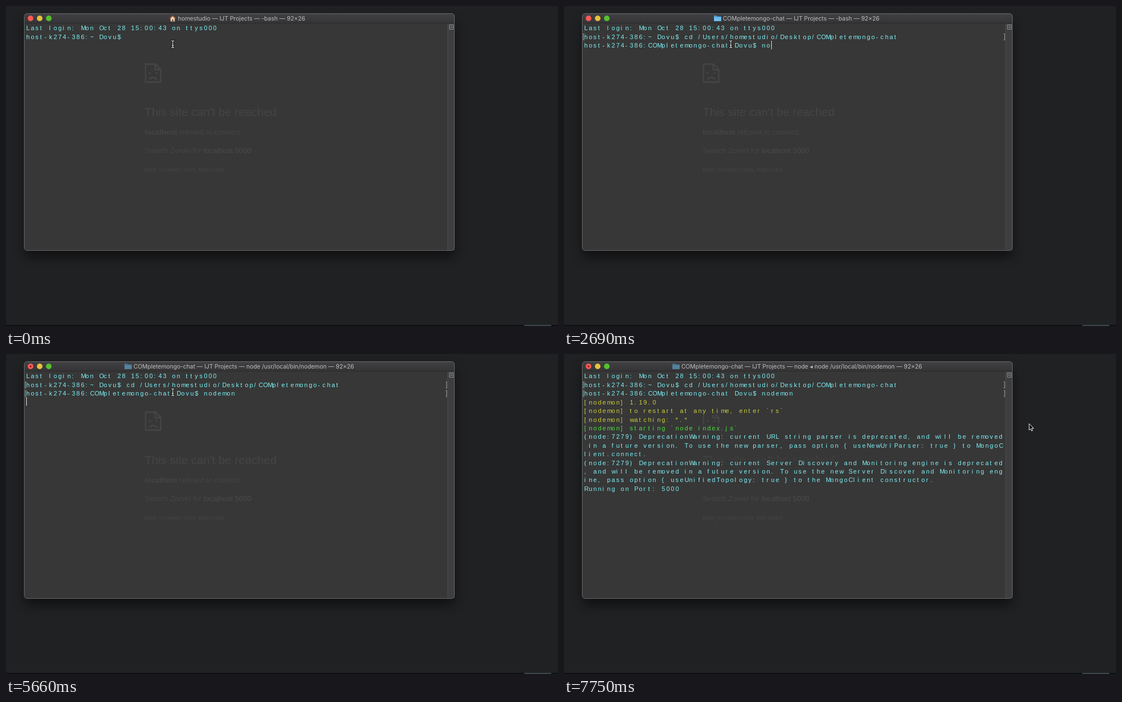
Animation, 983 px wide and 570 px high, one loop 8000 ms. Source, as an HTML page:

```html
<!DOCTYPE html>
<html lang="en">
<head>
<meta charset="utf-8">
<title>Terminal session</title>
<style>
  html, body { margin: 0; width: 100%; height: 100%; overflow: hidden; background: #202123; }
  svg { display: block; width: 100vw; height: 100vh; }
  text { white-space: pre; }
  .term { font: 11px "Liberation Sans", Arial, sans-serif; }
  .title { font: 10.45px Inter, sans-serif; fill: #bebebe; }
  .ghost { font: 13.2px "Liberation Sans", Arial, sans-serif; fill: #454545; }
</style>
</head>
<body>
<svg viewBox="0 0 983 570" xmlns="http://www.w3.org/2000/svg">
  <defs>
    <linearGradient id="bar" x2="0" y2="1">
      <stop stop-color="#414143"/>
      <stop offset="1" stop-color="#353537"/>
    </linearGradient>
    <filter id="blur" x="-10%" y="-15%" width="120%" height="130%">
      <feGaussianBlur stdDeviation="10"/>
    </filter>
  </defs>

  <rect width="983" height="570" fill="#202123"/>
  <rect y="568" width="983" height="2" fill="#0e0f10"/>
  <rect x="923" y="568" width="48" height="2" fill="#3b474c"/>
  <rect x="33" y="26" width="766" height="421" rx="8" fill="#000" opacity=".5" filter="url(#blur)"/>

  <!-- window -->
  <rect x="33" y="13.5" width="766" height="422" rx="5" fill="#373737"/>
  <path d="M33 30V18.500a5 5 0 0 1 5-5H794a5 5 0 0 1 5 5V30Z" fill="url(#bar)"/>
  <path d="M33 30.500H799" stroke="#2a2a2b"/>

  <!-- page showing through -->
  <g class="ghost">
    <path d="M248.500 103.500H266L275.500 113V135.500H248.500ZM265.500 104V113.500H275M255 131q7-7.500 14 0"
          fill="none" stroke="#454545" stroke-width="2.400"/>
    <path d="M254.500 118h3v3h-3zM266.500 118h3v3h-3z"/>
    <text x="247" y="196" font-size="20.700" style="font-size:20.700px">This site can't be reached</text>
    <text x="247" y="229"><tspan font-weight="bold">localhost</tspan> refused to connect.</text>
    <text x="247" y="262">Search Zorvel for <tspan fill="#4a4a4a">localhost 5000</tspan></text>
    <text x="247" y="294.500" style="font-size:9.700px">ERR_CONNECTION_REFUSED</text>
  </g>

  <!-- scroll bar -->
  <rect x="786" y="31" width="12.500" height="404" fill="#3e3e3f"/>
  <path d="M786.500 31V435" stroke="#4b4b4c"/>
  <path d="M789.500 33.500h7v8h-7zM791 36h4M791 38.500h4" fill="none" stroke="#8e8e8e"/>
  <rect x="32.500" y="13.500" width="766" height="422" rx="5" fill="none" stroke="#68686a"/>

  <!-- title bar -->
  <circle cx="43.700" cy="22" r="5" fill="#fb5a54"/>
  <circle cx="60" cy="22" r="5" fill="#e6bf3c"/>
  <circle cx="76.200" cy="22" r="5" fill="#54c22f"/>
  <circle id="busy" cx="43.700" cy="22" r="1.600" fill="#7a1512"/>
  <g id="house">
    <path d="M293 22L296.700 18.500L300.500 22V27.500H293Z" fill="#e3d3b4"/>
    <path d="M291.500 22.500L296.700 17.500L302 22.500" fill="none" stroke="#b5653f" stroke-width="1.600"/>
    <path d="M295.500 24h2.500v3.500h-2.500z" fill="#8a4f33"/>
  </g>
  <g id="folder">
    <path d="M0 1.500q0-1 1-1H4.500L6 2H12q1 0 1 1V9.500q0 1-1 1H1q-1 0-1-1Z" fill="#4a9fd4"/>
    <path d="M0 3.500H13V9.500q0 1-1 1H1q-1 0-1-1Z" fill="#70bdea"/>
  </g>
  <text id="title" class="title" y="26"></text>

  <g id="screen" class="term"></g>
  <rect id="caret" width="1" height="15" fill="#e4e4e4"/>

  <!-- pointers, drawn around their hot spots -->
  <g id="beam" fill="none" stroke-linecap="round">
    <path id="beamShape" d="M-2.500-6.300Q0-6.300 0-4.500Q0-6.300 2.500-6.300M0-4.500V4.500M-2.500 6.300Q0 6.300 0 4.500Q0 6.300 2.500 6.300M-1.500 2H1.500"
          stroke="#111" stroke-width="2.800"/>
    <use href="#beamShape"/>
    <path d="M-2.500-6.300Q0-6.300 0-4.500Q0-6.300 2.500-6.300M0-4.500V4.500M-2.500 6.300Q0 6.300 0 4.500Q0 6.300 2.500 6.300M-1.500 2H1.500"
          stroke="#f2f2f2" stroke-width="1.100"/>
  </g>
  <path id="arrow" d="M0 0V11.500L2.700 9L4.400 13L6.300 12.200L4.600 8.300H8Z" fill="#0a0a0a" stroke="#f4f4f4" stroke-width="1"/>
</svg>
<script>
const LOOP = 8000, COL = 8.115, ROW = 15.42;
const CYAN = "#7eeff4", YELLOW = "#cbcc3c", GREEN = "#50dc40";
const HOST = "host-k274-386:", USER = " Dovu$ ", DIR = "COMpletemongo-chat";
const PATH = "cd /Users/homestudio/Desktop/" + DIR;

const output = [
  [YELLOW, "[nodemon] 1.19.0"],
  [YELLOW, "[nodemon] to restart at any time, enter `rs`"],
  [YELLOW, "[nodemon] watching: *.*"],
  [GREEN, "[nodemon] starting `node index.js`"],
  [CYAN, "(node:7279) DeprecationWarning: current URL string parser is deprecated, and will be removed"],
  [CYAN, " in a future version. To use the new parser, pass option { useNewUrlParser: true } to MongoC"],
  [CYAN, "lient.connect."],
  [CYAN, "(node:7279) DeprecationWarning: current Server Discovery and Monitoring engine is deprecated"],
  [CYAN, ", and will be removed in a future version. To use the new Server Discover and Monitoring eng"],
  [CYAN, "ine, pass option { useUnifiedTopology: true } to the MongoClient constructor."],
  [CYAN, "Running on Port: 5000"]
];

const caption = (place, job) => `${place} — IJT Projects — ${job} — 92×26`;

// Each step changes part of the state; caret is [column, row].
const steps = [
  [0, { title: caption("homestudio", "-bash"), titleX: 306, home: true, busy: false,
        first: "", second: null, marks: 0, printed: 0, caret: null, beam: [297, 68], arrow: null }],
  [300, { first: "nodemon ", caret: [30, 1] }],
  [740, { first: PATH + " ", caret: [70, 1] }],
  [1790, { title: caption(DIR, "-bash"), titleX: 283, home: false, second: "", marks: 1, caret: [39, 2] }],
  [2690, { second: "no", caret: [41, 2] }],
  [2830, { second: "nod", caret: [42, 2] }],
  [2980, { second: "nodem", caret: [44, 2] }],
  [3130, { second: "nodemon", caret: [46, 2] }],
  [3430, { second: "nodemon ", caret: [47, 2] }],
  [4770, { caret: null }],
  [5220, { second: "nodemon", caret: [46, 2] }],
  [5510, { marks: 2, caret: [0, 3] }],
  [5660, { title: caption(DIR, "node /usr/local/bin/nodemon"), titleX: 227, busy: true }],
  [5960, { title: caption(DIR, "node ◂ node /usr/local/bin/nodemon"), titleX: 209, printed: 4, caret: [0, 7] }],
  [6560, { printed: 11, caret: [0, 14] }],
  [7160, { beam: [303.5, 65] }],
  [7310, { beam: null, arrow: [786, 104] }],
  [7600, { arrow: [827.5, 123.8] }],
  [7750, { arrow: [828.3, 124], caret: null }]
];

const $ = id => document.getElementById(id);
const show = (id, on) => $(id).setAttribute("display", on ? "inline" : "none");

function add(tag, attrs, text = "") {
  const el = document.createElementNS("http://www.w3.org/2000/svg", tag);
  for (const key in attrs) el.setAttribute(key, attrs[key]);
  el.textContent = text;
  $("screen").append(el);
}

// One row on the character grid, veiling the page behind it.
function addRow(row, text, fill) {
  add("rect", { x: 36, y: 31.3 + row * ROW, width: text.length * COL, height: ROW, fill: "#373737", opacity: 0.75 });
  const x = [...text].map((_, i) => (36.1 + i * COL).toFixed(2)).join(" ");
  add("text", { x, y: 43.4 + row * ROW, fill }, text);
}

function addMarks(row) {
  const y = 49.5 + (row - 1) * ROW;
  add("path", { d: `M36.300 ${y}H34.500v11H36.300M783 ${y}h1.700v11H783`, fill: "none", stroke: "#a9b0b0", "stroke-width": 0.9 });
}

function place(id, pos) {
  show(id, pos);
  if (pos) $(id).setAttribute("transform", `translate(${pos})`);
}

function draw(s) {
  $("screen").replaceChildren();
  addRow(0, "Last login: Mon Oct 28 15:00:43 on ttys000", CYAN);
  addRow(1, HOST + "~" + USER + s.first, CYAN);
  if (s.second !== null) addRow(2, HOST + DIR + USER + s.second, CYAN);
  output.slice(0, s.printed).forEach(([fill, text], i) => addRow(i + 3, text, fill));
  for (let row = 1; row <= s.marks; row++) addMarks(row);

  $("title").textContent = s.title;
  $("title").setAttribute("x", s.titleX);
  show("house", s.home);
  place("folder", s.home ? null : [s.titleX - 16, 16.5]);
  $("folder").setAttribute("opacity", s.busy ? 0.55 : 1);
  show("busy", s.busy);

  show("caret", s.caret);
  if (s.caret) {
    $("caret").setAttribute("x", Math.round(36.2 + s.caret[0] * COL));
    $("caret").setAttribute("y", Math.round(31.1 + s.caret[1] * 15.4));
  }
  place("beam", s.beam);
  place("arrow", s.arrow);
}

const start = performance.now();
let shown = -1;

function tick() {
  const t = (performance.now() - start) % LOOP;
  const count = steps.filter(([time]) => time <= t).length;
  if (count !== shown) {
    draw(Object.assign({}, ...steps.slice(0, count).map(step => step[1])));
    shown = count;
  }
  requestAnimationFrame(tick);
}
tick();
</script>
</body>
</html>
```
